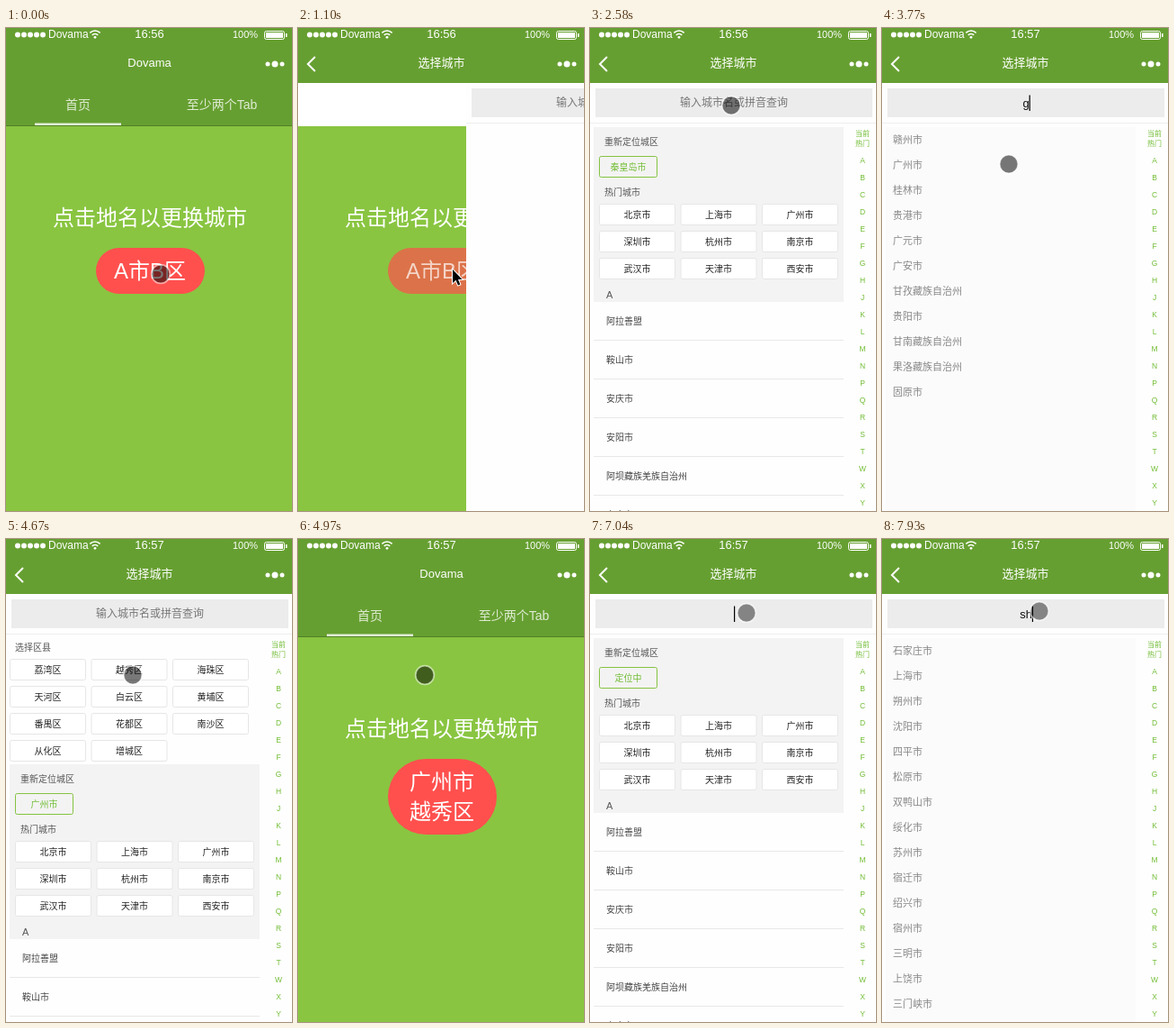
Recreate the animation shown at these times as an HTML page with a canvas. Size 318 by 536 pixels, loop 8000 ms.

```html
<!DOCTYPE html>
<html lang="zh-CN">
<head>
<meta charset="utf-8">
<title>选择城市</title>
<style>
html, body { margin: 0; width: 100%; height: 100%; overflow: hidden; }
canvas { display: block; width: 318px; height: 536px; }
</style>
</head>
<body>
<canvas id="stage" width="318" height="536"></canvas>
<script>
const W = 318, H = 536, LOOP = 8000;
const c = document.getElementById('stage').getContext('2d');
const FONT = '"Liberation Sans","Noto Sans CJK SC","Noto Sans CJK",sans-serif';
const APP = 'Dovama';
const DARK = '#669f31', GREEN = '#89c541', LEAF = '#72bd35';

const split = s => s.split(' ');
const hot = split('北京市 上海市 广州市 深圳市 杭州市 南京市 武汉市 天津市 西安市');
const districts = split('荔湾区 越秀区 海珠区 天河区 白云区 黄埔区 番禺区 花都区 南沙区 从化区 增城区');
const cities = split('阿拉善盟 鞍山市 安庆市 安阳市 阿坝藏族羌族自治州 安康市');
const results = {
  g: split('赣州市 广州市 桂林市 贵港市 广元市 广安市 甘孜藏族自治州 贵阳市 甘南藏族自治州 果洛藏族自治州 固原市'),
  s: split('石家庄市 上海市 朔州市 沈阳市 四平市 松原市 双鸭山市 绥化市 苏州市 宿迁市 绍兴市 宿州市 三明市 上饶市 三门峡市 商丘市')
};
const letters = [...'ABCDEFGHJKLMNPQRSTWXYZ'];

// Pointer path: time, x, y
const path = [
  [0, 172, 273], [1090, 172, 273], [1830, 150, 147], [2260, 150, 147], [2560, 157, 86],
  [3310, 157, 86], [3760, 141, 151], [5100, 141, 151], [5390, 172, 272], [5690, 172, 272],
  [5985, 179, 129], [6270, 174, 82], [7630, 174, 82], [7910, 175, 80], [LOOP, 175, 80]
];

const clamp = v => Math.max(0, Math.min(1, v));

function rect(x, y, w, h, color) {
  c.fillStyle = color;
  c.fillRect(x, y, w, h);
}

function round(x, y, w, h, r, fill, stroke) {
  c.beginPath();
  c.roundRect(x, y, w, h, r);
  if (fill) { c.fillStyle = fill; c.fill(); }
  if (stroke) { c.strokeStyle = stroke; c.lineWidth = 1; c.stroke(); }
}

function dot(x, y, r, color) {
  c.beginPath();
  c.arc(x, y, r, 0, 7);
  c.fillStyle = color;
  c.fill();
}

// y is the optical middle of the glyphs
function text(s, x, y, size, color, align = 'left', weight = 400) {
  c.font = `${weight} ${size}px ${FONT}`;
  c.textAlign = align;
  c.fillStyle = color;
  c.fillText(s, x, y + size * 0.37);
}

function line(points, color, width) {
  c.beginPath();
  points.forEach(p => c.lineTo(...p));
  c.strokeStyle = color;
  c.lineWidth = width;
  c.stroke();
}

function header(t, open) {
  rect(0, 0, W, 61, DARK);
  for (let i = 0; i < 5; i++) dot(13 + 7 * i, 7.5, 3, '#fff');
  text(APP, 47, 7, 12, '#fff');
  c.strokeStyle = '#fff';
  c.lineWidth = 1.6;
  for (const r of [4.5, 8]) {
    c.beginPath();
    c.arc(99, 11, r, -Math.PI * 0.75, -Math.PI * 0.25);
    c.stroke();
  }
  dot(99, 10.3, 1.4, '#fff');
  text(t < 3700 ? '16:56' : '16:57', 159.5, 6.5, 13, '#fff', 'center', 500);
  text('100%', 252, 7, 11, '#fff');
  round(287.5, 3.5, 22, 9, 2, null, '#fff');
  rect(289, 5, 19, 6, '#fff');
  rect(311, 6, 1.5, 4, '#fff');
  text(open ? '选择城市' : APP, 159.5, 38.5, 13, '#fff', 'center', 500);
  [2.5, 3.5, 2.5].forEach((r, i) => dot(291 + 8 * i, 40, r, '#fff'));
  if (open) line([[19, 32], [11, 40], [19, 48]], '#fff', 2);
}

function home(t, open) {
  rect(0, 61, W, 48, open ? '#fff' : DARK);
  rect(0, 109, W, H - 109, GREEN);
  if (!open) {
    rect(0, 108, W, 1, '#527f27');
    rect(32, 105.5, 96, 2.5, '#e0ecd5');
    text('首页', 80, 85, 14, '#e0ecd5', 'center');
    text('至少两个Tab', 240, 85, 14, '#e0ecd5', 'center');
  }
  text('点击地名以更换城市', 160, 210, 24, '#fff', 'center');
  const place = t < 4900 ? ['A市B区'] : ['广州市', '越秀区'];
  const h = 18 + 33 * place.length;
  c.globalAlpha = open ? 0.7 : 1;
  round(100, 244, 121, h, h / 2, '#ff504e');
  place.forEach((s, i) => text(s, 160, 269.5 + 33 * i, 24, '#fff', 'center'));
  c.globalAlpha = 1;
}

function cards(names, x, y) {
  names.forEach((s, i) => {
    const cx = x + 90.5 * (i % 3), cy = y + 30 * Math.floor(i / 3);
    round(cx + 0.5, cy + 0.5, 84, 23, 2, '#fff', '#e6e6e6');
    text(s, cx + 42.5, cy + 12, 10, '#222', 'center');
  });
}

function cityList(located, rows) {
  let top = 110;
  if (rows >= 0) {
    text('选择区县', 10, 120, 10, '#555');
    if (rows) cards(districts, 4, 133);
    top = 130 + 30 * rows;
  }
  c.save();
  c.translate(0, top - 110);
  rect(4, 110, 278, 194, '#f3f3f3');
  text('重新定位城区', 16, 126, 10, '#555');
  round(10.5, 142.5, 64, 23, 2, null, '#84c341');
  text(located, 42.5, 154, 10, LEAF, 'center');
  text('热门城市', 16, 182, 10, '#555');
  cards(hot, 10, 195);
  text('A', 18, 296, 11, '#555');
  cities.forEach((s, i) => {
    text(s, 18, 325 + 43 * i, 10, '#444');
    rect(4, 346 + 43 * i, 278, 1, '#e8e8e8');
  });
  c.restore();
}

function queryAt(t) {
  if (t > 2850 && t < 3900) return 'g';
  return t < 7300 ? '' : t < 7900 ? 's' : 'sh';
}

function page(t, x) {
  c.save();
  c.translate(x, 0);
  rect(0, 61, W, H - 61, '#fefefe');
  rect(6, 67, 308, 32, '#ececec');
  rect(0, 105, W, 1, '#eee');

  const query = queryAt(t);
  if (query || t > 6260) {
    text(query, 160, 83, 13, '#111', 'center');
    const end = 160 + c.measureText(query).width / 2;
    if (query || t > 7000) rect(end, 74.5, 1.2, 17.5, '#000');
  } else {
    text('输入城市名或拼音查询', 160, 83, 12, '#777', 'center', 500);
  }

  if (t > 1370) {
    if (query) {
      rect(4, 110, 278, H - 110, '#fbfbfb');
      results[query[0]].forEach((s, i) => text(s, 12, 124 + 28 * i, 11, '#888'));
    } else if (t > 3900 && t < 4900) {
      cityList('广州市', t < 4340 ? 0 : 4);
    } else {
      cityList(t > 2260 && t < 4900 ? '秦皇岛市' : '定位中', -1);
    }
    text('当前', 303, 117.5, 8, LEAF, 'center');
    text('热门', 303, 128, 8, LEAF, 'center');
    letters.forEach((s, i) => text(s, 303, 147 + 19 * i, 8.5, LEAF, 'center'));
  }
  c.restore();
}

function pointer(t) {
  const i = path.findIndex(p => p[0] > t);
  const [a, b] = [path[i - 1], path[i]];
  const k = (t - a[0]) / (b[0] - a[0]);
  const x = a[1] + (b[1] - a[1]) * k, y = a[2] + (b[2] - a[2]) * k;
  if (t > 490 && t < 2260) {
    const tip = [[0, 0], [0, 15], [3.5, 11.8], [6, 17.5], [8.3, 16.5], [6, 11], [10.5, 11]];
    c.beginPath();
    tip.forEach(([px, py]) => c.lineTo(x + px, y - 5 + py));
    c.closePath();
    c.strokeStyle = '#fff';
    c.lineWidth = 2;
    c.stroke();
    c.fillStyle = '#000';
    c.fill();
    return;
  }
  const pressed = t < 5650 || (t > 6260 && t < 6410);
  dot(x, y, 10, `rgba(0,0,0,${pressed ? 0.53 : 0.44})`);
  c.beginPath();
  c.arc(x, y, 10.3, 0, 7);
  c.strokeStyle = 'rgba(255,255,255,.5)';
  c.lineWidth = 1.8;
  c.stroke();
}

function draw(now) {
  // The screen refreshes in steps of about 148 ms
  const step = 148.5, phase = 49;
  const t = Math.max(0, Math.floor((now % LOOP - phase) / step) * step + phase);
  const open = (t > 490 && t < 4900) || t > 5380;
  const slide = clamp((t - (t < 4900 ? 903 : 5652)) / 450);
  home(t, open);
  if (open && slide > 0) page(t, Math.round(W * (1 - slide)));
  header(t, open);
  pointer(t);
  requestAnimationFrame(draw);
}
requestAnimationFrame(draw);
</script>
</body>
</html>
```
